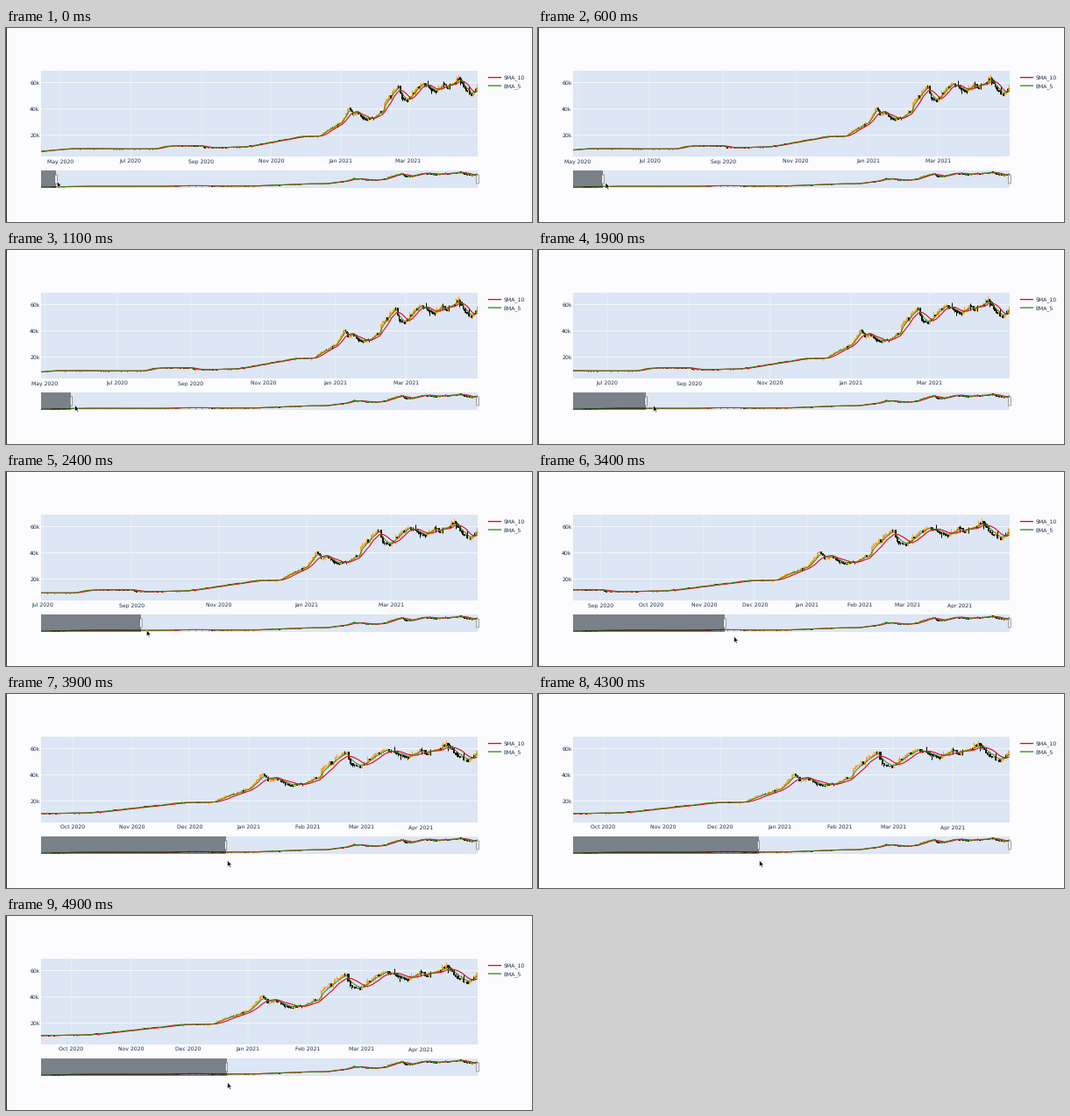
These frames come from a looping animation (600x222 px, 5 s). A matplotlib script:

```python
import numpy as np
import matplotlib.dates as mdates
import matplotlib.pyplot as plt
from matplotlib.animation import FuncAnimation
from matplotlib.collections import LineCollection, PolyCollection
from matplotlib.patches import Polygon, Rectangle

W, H = 600, 222
FRAMES, INTERVAL = 50, 100
LEFT, RIGHT = 40, 538
DAYS = 395
DAY_ZERO = mdates.date2num(np.datetime64("2020-04-01"))
FIRST, LAST = DAY_ZERO - 0.5, DAY_ZERO + DAYS - 0.5
PRICE_RANGE = (3.3, 68.6)
INK, PLOT_BG = "#1b2d4a", "#dce6f4"
RISE, FALL, SMA_COLOR, EMA_COLOR = "#ffa01e", "#0a0a0a", "#e8001f", "#2c8a12"

plt.rcParams.update({"font.family": "DejaVu Sans", "font.size": 6.1,
                     "text.hinting": "none", "text.color": INK})

# Main turns of the price: (day, thousands)
TURNS = [
    (0, 6.6), (36, 9.5), (112, 9.3), (122, 11.6), (153, 11.7), (156, 10.2),
    (190, 10.8), (218, 15.2), (238, 18.7), (257, 19.2), (262, 23.3),
    (275, 29.5), (282, 40.8), (286, 35.5), (289, 37.5), (296, 31.8),
    (304, 33.5), (312, 39), (313, 46), (326, 57.3), (328, 48.8), (333, 46),
    (346, 60.5), (358, 53), (364, 59), (371, 57.5), (378, 63.4),
    (383, 56), (389, 49.5), (394, 57),
]

# Handle x, cursor x and cursor y by time in seconds
DRAG = np.array([
    (0, 57.1, 58.3, 175.5), (0.6, 74, 77, 177), (1.2, 74.5, 79, 177.7),
    (1.9, 123.2, 131.7, 177.9), (2.8, 178.5, 183.4, 183.3),
    (3.4, 213, 223.6, 188.2), (3.9, 250.6, 252.7, 190.5),
    (4.3, 251.5, 252.7, 190.5),
])
ARROW = np.array([(0, 0), (0, 7), (1.6, 5.6), (2.7, 8), (3.7, 7.5),
                  (2.7, 5.2), (4.8, 5)])

# Daily swings and wicks grow wilder over the year
rng = np.random.default_rng(5)
day = np.arange(DAYS)
swing = 0.007 + 0.009 * day / DAYS
close = np.interp(day, *zip(*TURNS)) * (1 + swing * rng.normal(size=DAYS))
open_ = np.r_[close[0], close[:-1]]
high = np.maximum(open_, close) * (1 + swing * rng.exponential(1, DAYS))
low = np.minimum(open_, close) * (1 - swing * rng.exponential(1.2, DAYS))
date = DAY_ZERO + day

sma = np.convolve(close, np.ones(10) / 10, "valid")
ema = close.copy()
for i in range(1, DAYS):
    ema[i] = ema[i - 1] + (close[i] - ema[i - 1]) / 3

fig = plt.figure(figsize=(W / 72, H / 72), dpi=72, facecolor="#fcfbfd")


def add_panel(top, bottom):
    ax = fig.add_axes((LEFT / W, 1 - bottom / H, (RIGHT - LEFT) / W, (bottom - top) / H),
                      facecolor=PLOT_BG)
    ax.spines[:].set_visible(False)
    for up, color in ((True, RISE), (False, FALL)):
        chosen = day[(close >= open_) == up]
        wicks = [[(date[d], low[d]), (date[d], high[d])] for d in chosen]
        bodies = [[(date[d] - 0.3, open_[d]), (date[d] + 0.3, open_[d]),
                   (date[d] + 0.3, close[d]), (date[d] - 0.3, close[d])] for d in chosen]
        ax.add_collection(LineCollection(wicks, colors=color, linewidths=1, zorder=2))
        ax.add_collection(PolyCollection(bodies, facecolors=color, edgecolors=color,
                                         linewidths=0.9, zorder=2))
    ax.plot(date[9:], sma, color=SMA_COLOR, lw=1.1, zorder=3)
    ax.plot(date, ema, color=EMA_COLOR, lw=0.95, zorder=4)
    ax.set(xlim=(FIRST, LAST), ylim=PRICE_RANGE)
    return ax


def add_grip():
    return overlay.add_patch(Rectangle((RIGHT - 1.2, 168), 2.4, 10, fc="white",
                                       ec="#555555", lw=0.6, snap=False))


main = add_panel(49.3, 147.3)
main.set_axisbelow(True)
main.grid(axis="x", color="white", lw=0.35)
main.grid(axis="y", color="white", lw=0.7)
main.tick_params(length=0, labelcolor=INK)
main.tick_params(axis="x", pad=2.4)
main.tick_params(axis="y", pad=1.5)
main.set_yticks([20, 40, 60], ["20k", "40k", "60k"])

slider = add_panel(163, 183)
slider.set(xticks=[], yticks=[])
mask = slider.add_patch(Rectangle((FIRST, 0), 1, 80, fc="black", alpha=0.44, lw=0, zorder=5))

overlay = fig.add_axes((0, 0, 1, 1))
overlay.set(xlim=(0, W), ylim=(H, 0))
overlay.axis("off")
overlay.add_patch(Rectangle((0, 0), 1, H, fc="#333333", lw=0))
for y, color, name in ((56.6, SMA_COLOR, "SMA_10"), (66, EMA_COLOR, "EMA_5")):
    overlay.plot([550.5, 564.5], [y, y], color=color, lw=1.3, snap=False)
    overlay.text(567.2, y, name, va="center_baseline")
add_grip()
grip = add_grip()
cursor = overlay.add_patch(Polygon(ARROW, fc="black", ec="white", lw=0.5))


def update(frame):
    t = frame * INTERVAL / 1000
    x, *tip = (np.interp(t, DRAG[:, 0], path) for path in DRAG.T[1:])
    start = FIRST + (x - LEFT) / (RIGHT - LEFT) * DAYS
    # Monthly labels once about ten months are left in view
    step = 1 if LAST - start <= 304.4 else 2
    main.xaxis.set_major_locator(mdates.MonthLocator(range(1, 13, step)))
    main.xaxis.set_major_formatter(mdates.DateFormatter("%b %Y"))
    main.set_xlim(start, LAST)
    mask.set_width(start - FIRST)
    grip.set_x(x - 1.2)
    cursor.set_xy(ARROW + tip)


animation = FuncAnimation(fig, update, frames=FRAMES, interval=INTERVAL,
                          repeat=True, repeat_delay=0)
plt.show()
```
